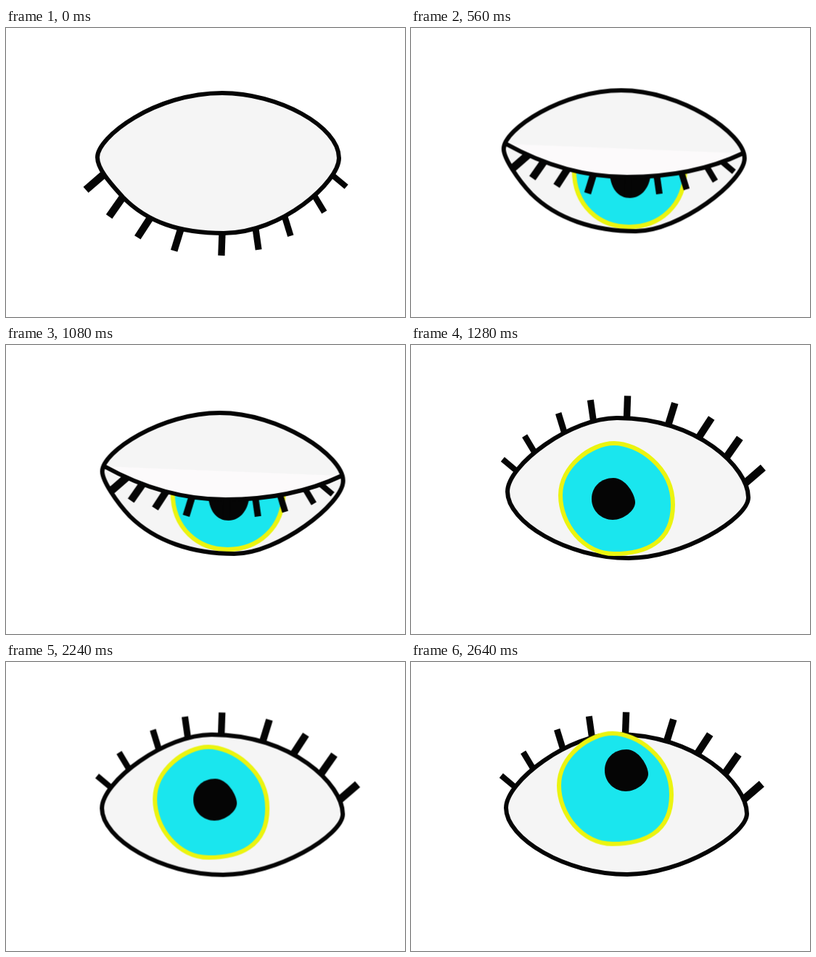
Write an HTML page that moves like this. It is 550 px wide and 400 px high and loops after 3320 ms.

```html
<!DOCTYPE html>
<html lang="en">
<head>
<meta charset="utf-8">
<title>Opening eye</title>
<style>
  html, body { margin: 0; width: 100%; height: 100%; overflow: hidden; background: #fff; }
  svg { display: block; width: 550px; height: 400px; }
  .skin { fill: #f5f5f5; }
  .band { fill: #fcfafb; }
  .ink { fill: #050505; }
  .line, .lash { fill: none; stroke: #050505; }
  .line { stroke-width: 6; stroke-linecap: round; }
  .iris { fill: #1ae6ee; stroke: #ebf410; stroke-width: 6; }

  /* 83 ticks of 40 ms; drifts advance once per tick */
  g { animation: 3320ms step-end infinite; }
  #closed { animation-name: show-closed, drift-closed; }
  #half { animation-name: show-half, drift-half; }
  #open { animation-name: show-open, drift-open; }
  #iris { animation-name: look-iris; }
  #pupil { animation-name: look-pupil; }

  @keyframes show-closed { 0% { opacity: 1 } 16.867%, 100% { opacity: 0 } }
  @keyframes show-half { 0% { opacity: 0 } 16.867% { opacity: 1 } 34.939%, 100% { opacity: 0 } }
  @keyframes show-open { 0% { opacity: 0 } 34.939%, 100% { opacity: 1 } }

  @keyframes drift-closed {
    0% { transform: none; animation-timing-function: steps(14) }
    16.867%, 100% { transform: translate(1.8px, -14.2px) }
  }
  @keyframes drift-half {
    0% { transform: translate(-2.3px, -3.7px) }
    16.867% { transform: translate(-2.3px, -3.7px); animation-timing-function: steps(15) }
    34.939%, 100% { transform: translate(3.4px, 5.1px) }
  }
  @keyframes drift-open {
    0%, 60.24% { transform: none; animation-timing-function: steps(12) }
    74.698% { transform: translate(-1.6px, -.9px) }
    77.108%, 100% { transform: translate(-2px, -1px) }
  }
  @keyframes look-iris {
    0% { transform: translate(0, 18px) }
    60.24% { transform: none }
    77.108%, 100% { transform: translate(0, -18.3px) }
  }
  @keyframes look-pupil {
    0% { transform: translate(-10px, 22px) }
    60.24% { transform: none }
    77.108%, 100% { transform: translate(10px, -40px) }
  }
</style>
</head>
<body>
<svg viewBox="0 0 550 400">
  <g id="closed"></g>
  <g id="half"></g>
  <g id="open"></g>
</svg>
<script>
// One fan of lashes serves all three eyes: distance from the middle and lean in degrees
const offsets = [-163, -137, -99, -57, 0, 46, 86, 127, 152];
const leans = [49, 35, 33, 17, 2, -8, -17, -31, -50];

const path = (cls, d, more = '') => `<path class="${cls}" d="${d}" ${more}/>`;
const fill = (id, ...parts) => { document.getElementById(id).innerHTML = parts.join(''); };

// Point of a left-to-right curve at a given x
function pointAt(d, x) {
  const curve = document.createElementNS('http://www.w3.org/2000/svg', 'path');
  curve.setAttribute('d', d);
  let lo = 0, hi = curve.getTotalLength();
  for (let i = 0; i < 20; i++) {
    const mid = (lo + hi) / 2;
    if (curve.getPointAtLength(mid).x < x) lo = mid; else hi = mid;
  }
  return curve.getPointAtLength(lo);
}

// Lashes growing from a curve; scale shrinks the fan, flip turns it upside down
function lashes(d, middle, scale = 1, flip = false) {
  return offsets.map((offset, i) => {
    const p = pointAt(d, middle + offset * scale * (flip ? -1 : 1));
    const length = (33 - i * i / 8) * scale;
    const turn = leans[i] + (flip ? 180 : 0);
    return path('lash', `M0,0V${length}`,
      `stroke-width="${10.8 - i * .36}" transform="translate(${p.x},${p.y}) rotate(${turn})"`);
  }).join('');
}

// Each eye: upper and lower rim, both from the left corner to the right
const closedTop = 'M126,179C126,151 205,90 298,90C375,90 459,136 459,180';
const closedLow = 'M126,179C126,196 146,217 161,234C195,269 240,284 300,284C380,284 459,213 459,180';
fill('closed',
  path('skin', closedTop + closedLow),
  path('line', closedTop + closedLow),
  lashes(closedLow, 298));

const halfTop = 'M130,171C130,144 211,90 292,90C374,90 462,149 462,184';
const halfLow = 'M130,171C130,184 150,214 168,233C203,268 255,285 312,285C372,285 462,216 462,184';
const lid = 'M133,164C185,193 240,210 300,210C360,210 412,200 460,177';
fill('half',
  path('skin', halfTop + halfLow),
  path('iris', 'M227,200C227,250 262,279 303,279S380,250 380,200Z'),
  path('ink', 'M276,200C276,226 288,239 304,239S333,224 333,200Z'),
  path('skin', halfTop),
  path('band', lid),
  path('line', halfTop + halfLow + lid),
  lashes(lid, 302, .85));

const openTop = 'M133,203C133,166 221,100 285,101C395,101 465,170 465,211';
const openLow = 'M133,203C133,245 215,295 300,295C375,295 465,240 465,211';
fill('open',
  path('skin', openTop + openLow),
  path('line', openTop + openLow),
  lashes(openTop, 297.5, 1, true),
  '<g id="iris">' + path('iris', `M206,190C206,150 248,118 280,118S361,150 361,203
    S322,271 280,271S206,230 206,190Z`) + '</g>',
  '<g id="pupil">' + path('ink', `M259,191C259,174 272,162 289,162S319,185 319,196
    S303,220 288,220S259,208 259,191Z`) + '</g>');
</script>
</body>
</html>
```
